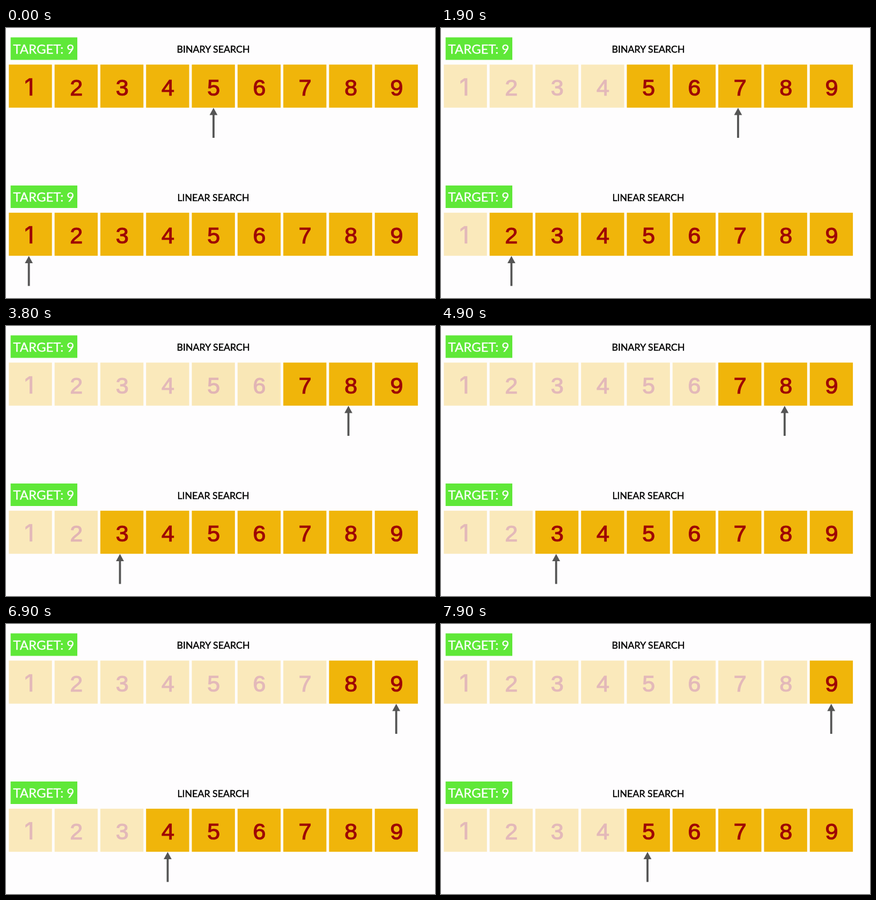
Recreate the animation shown at these times as an HTML page. Size 800x504 px, loop 8000 ms.

```html
<!DOCTYPE html>
<html lang="en">
<head>
<meta charset="utf-8">
<title>Binary and linear search</title>
<style>
  html, body { margin: 0; width: 100%; height: 100%; overflow: hidden; background: #fefdfe; }
  svg { display: block; width: 800px; height: 504px; }
  text { text-anchor: middle; }
  .digit { font: 43px "Liberation Sans", Arial, sans-serif; fill: #9e0505; stroke: #9e0505; stroke-width: 1.2; }
  .one { font: 500 44px Inter, Roboto, sans-serif; stroke-width: .3; }
  .label { font: 24px Lato, sans-serif; fill: #fff; stroke: #fff; stroke-width: .35; }
  .title { font: 17.8px Lato, sans-serif; fill: #000; stroke: #000; stroke-width: .45; }
</style>
</head>
<body>
<svg id="stage" viewBox="0 0 800 504"></svg>
<script>
const LOOP = 8000, MOVE = 1000, FADED = 0.27;
const COUNT = 9, PITCH = 85.3;
const starts = [960, 2950, 4940, 6930];
const stage = document.getElementById("stage");

// stops: arrow x after each step; cuts: how many cells are ruled out by then
const searches = [
  { title: "BINARY SEARCH", y: 0, stops: [387, 554.3, 640.8, 727.7, 727.7], cuts: [0, 4, 6, 7, 8] },
  { title: "LINEAR SEARCH", y: 276.5, stops: [42.6, 131.5, 214.7, 301.5, 385.1], cuts: [0, 1, 2, 3, 4] }
];

function add(parent, name, attrs, text) {
  const node = document.createElementNS("http://www.w3.org/2000/svg", name);
  for (const key in attrs) node.setAttribute(key, attrs[key]);
  if (text) node.textContent = text;
  return parent.appendChild(node);
}

function build(search) {
  const group = add(stage, "g", { transform: `translate(0 ${search.y})` });
  add(group, "rect", { x: 8.6, y: 17.5, width: 124.4, height: 42, fill: "#5fe838" });
  add(group, "text", { x: 70.3, y: 47.8, class: "label" }, "TARGET: 9");
  add(group, "text", { x: 386.5, y: 46.4, class: "title" }, search.title);
  search.cells = Array.from({ length: COUNT }, (_, i) => {
    const x = 5.3 + i * PITCH;
    const cell = add(group, "g", {});
    add(cell, "rect", { x, y: 68.3, width: 80.4, height: 80.4, fill: "#f0b50a" });
    add(cell, "text", { x: x + (i ? 40.7 : 38), y: 125.6, class: i ? "digit" : "digit one" }, String(i + 1));
    return cell;
  });
  search.arrow = add(group, "path", { d: "M0 149 L7.4 162.5 H1.9 V205 H-1.9 V162.5 H-7.4 Z", fill: "#555" });
}

function ease(x) {
  x = Math.min(1, Math.max(0, x));
  return x * x * x * (10 - 15 * x + 6 * x * x);
}

function draw(time) {
  const progress = starts.map(start => ease((time - start) / MOVE));
  for (const { stops, cuts, cells, arrow } of searches) {
    const x = progress.reduce((sum, p, i) => sum + p * (stops[i + 1] - stops[i]), stops[0]);
    arrow.setAttribute("transform", `translate(${x} 0)`);
    cells.forEach((cell, i) => {
      const step = cuts.findIndex(cut => cut > i) - 1;
      cell.setAttribute("opacity", step < 0 ? 1 : 1 - (1 - FADED) * progress[step]);
    });
  }
}

searches.forEach(build);
draw(0);
const origin = performance.now();
function tick() {
  draw((performance.now() - origin) % LOOP);
  requestAnimationFrame(tick);
}
requestAnimationFrame(tick);
</script>
</body>
</html>
```
